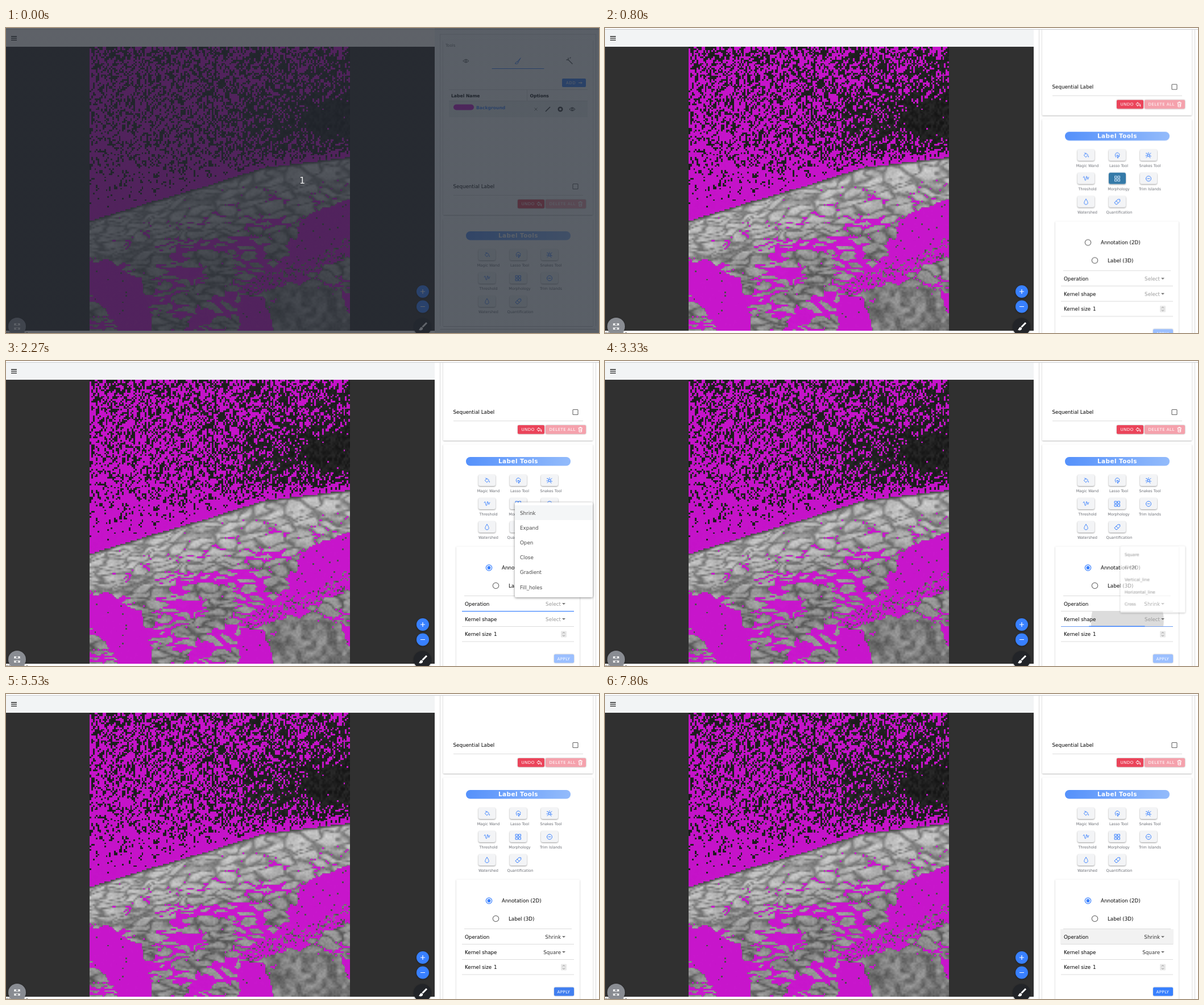
Recreate the animation shown at these times as an HTML page with a canvas. Size 1043x537 px, loop 8000 ms.

```html
<!DOCTYPE html>
<html lang="en">
<head>
<meta charset="utf-8">
<title>Label tools</title>
<style>
html, body { margin: 0; width: 100%; height: 100%; overflow: hidden; background: #303030; }
canvas { position: absolute; left: 147px; top: 33px; width: 458px; height: 500px; }
.mask { image-rendering: pixelated; }
svg { position: absolute; left: 0; top: 0; font: 8.72px "DejaVu Sans", sans-serif; }
.line { stroke: #dcdcdc; }
.card { fill: #fff; filter: drop-shadow(0 1.2px 1px #0004); }
.icon { fill: none; stroke: #3880ff; stroke-linecap: round; stroke-linejoin: round; }
.cap { font-size: 7.08px; letter-spacing: .06em; fill: #fff; }
.tools text { font-size: 6.54px; text-anchor: middle; fill: #6b6e75; }
.value { text-anchor: end; fill: #333; }
.bold { font-weight: bold; font-size: 7.63px; }
.menu .card { filter: drop-shadow(0 1.5px 2px #0007); }
.menu text { fill: #4a4a4a; }
.menu, .grow { transform-box: fill-box; transform-origin: center; }
.menu { transform-origin: 50% 100%; }

/* 1% of the loop is 80 ms */
[class*="t-"] { animation: 8s linear infinite; }
.t-intro { animation-name: intro; }
.t-scroll { animation-name: scroll; }
.t-closed { animation-name: closed; }
.t-open { animation-name: open; }
.t-morph { animation-name: morph; }
.t-rowhover { animation-name: rowhover; }
.t-rowripple { animation-name: rowripple; }
.t-radio { animation-name: radio; }
.t-dot { animation-name: dot; }
.t-opempty { animation-name: opempty; }
.t-opset { animation-name: opset; }
.t-opripple { animation-name: opripple; }
.t-opline { animation-name: opline; }
.t-opmenu { animation-name: opmenu; }
.t-oppick { animation-name: oppick; }
.t-ophover { animation-name: ophover; }
.t-kempty { animation-name: kempty; }
.t-kset { animation-name: kset; }
.t-kripple { animation-name: kripple; }
.t-kfocus { animation-name: kfocus; }
.t-kline { animation-name: kline; }
.t-kmenu { animation-name: kmenu; }
.t-khover { animation-name: khover; }
.t-kpick { animation-name: kset; }
.t-apply { animation-name: apply; }
.t-applyripple { animation-name: applyripple; }
.t-undo { animation-name: undo; }
.t-undoripple { animation-name: undoripple; }
.t-full { animation-name: full; }
.t-shrunk { animation-name: shrunk; }

@keyframes intro { 0%, .86% { opacity: 1 } .87%, 100% { opacity: 0 } }
@keyframes scroll {
  0%, 5.85% { transform: translateY(189px); animation-timing-function: cubic-bezier(.3,.35,.6,.9) }
  10% { transform: translateY(13.7px); animation-timing-function: ease-out }
  14.5%, 100% { transform: none }
}
@keyframes closed { 0%, 5.86% { opacity: 1 } 5.87%, 100% { opacity: 0 } }
@keyframes open { 0%, 5.86% { opacity: 0 } 5.87%, 100% { opacity: 1 } }
@keyframes morph { 0%, 5.86% { opacity: 0 } 5.87%, 16.5% { opacity: 1 } 17.4%, 100% { opacity: 0 } }
@keyframes rowhover { 0%, 16.6% { opacity: 0 } 17.4%, 21.5% { opacity: 1 } 22.5%, 100% { opacity: 0 } }
@keyframes rowripple {
  0%, 17.4% { opacity: 0; transform: scaleX(.3) }
  17.5% { opacity: .8 } 18.37% { opacity: 1; transform: none } 21%, 100% { opacity: 0; transform: none }
}
@keyframes radio { 0%, 17.4% { stroke: #737373 } 18.3%, 100% { stroke: #3880ff } }
@keyframes dot { 0%, 17.5% { transform: scale(0) } 18.37% { transform: scale(.4) } 20%, 100% { transform: none } }
@keyframes opempty { 0%, 34.1% { opacity: 1 } 34.11%, 100% { opacity: 0 } }
@keyframes opset { 0%, 34.1% { opacity: 0 } 34.11%, 100% { opacity: 1 } }
@keyframes opripple { 0%, 23.3% { opacity: 0; transform: scaleX(.3) } 24.2% { opacity: 1; transform: none } 28%, 100% { opacity: 0; transform: none } }
@keyframes opline { 0%, 23.3% { opacity: 1; transform: scaleX(0) } 25%, 36% { opacity: 1; transform: none } 36.6%, 100% { opacity: 0; transform: none } }
@keyframes opmenu {
  0%, 23.6% { opacity: 0; transform: scale(.8) } 26.6%, 34.1% { opacity: 1; transform: none }
  34.12% { opacity: .75; transform: none } 36.4%, 100% { opacity: 0; transform: none }
}
@keyframes oppick { 0%, 27.4% { opacity: 0 } 29%, 100% { opacity: 1 } }
@keyframes ophover { 0%, 94% { opacity: 0 } 96%, 100% { opacity: 1 } }
@keyframes kempty { 0%, 58.35% { opacity: 1 } 58.36%, 100% { opacity: 0 } }
@keyframes kset { 0%, 58.35% { opacity: 0 } 58.36%, 100% { opacity: 1 } }
@keyframes kripple { 0%, 41.59% { opacity: 0; transform: none } 41.6%, 42.5% { opacity: 1; transform: none } 46.6%, 100% { opacity: 0; transform: scaleX(1.2) } }
@keyframes kfocus { 0%, 41.59% { opacity: 0 } 41.6%, 59% { opacity: 1 } 60%, 100% { opacity: 0 } }
@keyframes kline {
  0%, 41.59% { opacity: 0; transform: scaleX(.4) } 41.6% { opacity: 1; transform: scaleX(.49) }
  43.5%, 59% { opacity: 1; transform: none } 60%, 100% { opacity: 0; transform: none }
}
@keyframes kmenu {
  0%, 41.59% { opacity: 0; transform: scale(.8) }
  41.6% { opacity: .6; transform: scale(.828); animation-timing-function: ease-out }
  44%, 58.35% { opacity: 1; transform: none }
  58.36% { opacity: .78; transform: none } 59.9%, 100% { opacity: 0; transform: none }
}
@keyframes khover { 0%, 45.7% { opacity: 0 } 46.6%, 100% { opacity: 1 } }
@keyframes apply {
  0%, 58.35% { fill: #9bbfff } 58.36%, 64.9% { fill: #3880ff }
  64.98%, 69% { fill: #4c8dff } 69.1%, 79% { fill: #417ff0 } 79.1%, 100% { fill: #3880ff }
}
@keyframes applyripple { 0%, 70.7% { opacity: 0; transform: scaleX(.3) } 71.6% { opacity: .25; transform: none } 75%, 100% { opacity: 0; transform: none } }
@keyframes undo { 0%, 89% { fill: #eb445a } 89.1%, 95% { fill: #ed576b } 97.4%, 100% { fill: #eb445a } }
@keyframes undoripple { 0%, 91.5% { opacity: 0; transform: scaleX(.3) } 93% { opacity: .25; transform: none } 97%, 100% { opacity: 0; transform: none } }
@keyframes full { 0%, 70.85% { opacity: 1 } 70.86%, 92.44% { opacity: 0 } 92.45%, 100% { opacity: 1 } }
@keyframes shrunk { 0%, 70.85% { opacity: 0 } 70.86%, 92.44% { opacity: 1 } 92.45%, 100% { opacity: 0 } }
</style>
</head>
<body>
<canvas id="scan"></canvas>
<canvas id="full" class="mask t-full"></canvas>
<canvas id="shrunk" class="mask t-shrunk"></canvas>

<svg width="1043" height="537" viewBox="0 0 1043 537">
  <defs>
    <linearGradient id="pill"><stop stop-color="#5591fb"/><stop offset="1" stop-color="#93bbfb"/></linearGradient>
    <linearGradient id="veil"><stop offset=".7225" stop-color="#242932" stop-opacity=".72"/><stop offset=".7225" stop-color="#262d37" stop-opacity=".76"/></linearGradient>
    <clipPath id="panel"><path d="M754 3h289v534H754z"/></clipPath>
    <rect id="btn" x="-15" y="-10" width="30" height="20" rx="3"/>
    <path id="bucket" d="M-3.5-.5L0-4 3.5-.5 0 3ZM-2.5-4.5L0-2M4.2 1.5c1.2 2-1.2 2 0 0"/>
    <path id="lasso" d="M-2.5 3C-6-3-1-5 1-4.4S5-1 3.6 0M-.5-.5L4 1.6 1.8 2.4 1 4.6Z"/>
    <path id="snakes" d="M-2 0a2 2 0 1 0 4 0 2 2 0 1 0-4 0M-4.5-3.5h2l1 2M4-4l-2.5 2.5M4.5 1.5L2 1M3 4.5L1 2M-4 4l2.5-2.5M0-5v1.5M-5 .5h2"/>
    <path id="threshold" d="M-4.8-2c1-3 2-2 2.2 1S-1 5.5 0 1 0-5 1.5-3.5 2.5 2 3.4 1 3.5-3 5-2.5"/>
    <path id="grid" d="M-4.5-4.5h3.6v3.6h-3.6zM.9-4.5h3.6v3.6H.9zM-4.5.9h3.6v3.6h-3.6zM.9.9h3.6v3.6H.9z"/>
    <path id="trim" d="M-4.5 0a4.5 4.5 0 1 0 9 0 4.5 4.5 0 1 0-9 0M-2 0h4"/>
    <path id="drop" d="M0-4.8C4.5.5 4 4.5 0 4.5S-4.5.5 0-4.8Z"/>
    <path id="patch" d="M-4.8 1.2L1-4.5 4.6-4.5 4.8-1-1 4.5Q-3 5-4.8 1.2M-2-1.5L1.8 1.8"/>
    <path id="eye" d="M-5 0Q0-6 5 0 0 6-5 0M-1.7 0a1.7 1.7 0 1 0 3.4 0 1.7 1.7 0 1 0-3.4 0"/>
    <path id="brush" d="M5-5L-.5 1M5-5L1 2M-1 1.5C-4 1-2.5 4.5-5 4.5-2 6 1 5 .8 2.5Z"/>
    <path id="caret" d="M-3-1.3h6L0 1.5z"/>
  </defs>

  <path fill="#fff" d="M0 0h1043v537H754V33H0zM0 533h754v4H0z"/>
  <path fill="#f2f4f5" d="M0 3h754v30H0z"/>
  <path stroke="#c9cbce" d="M0 2.5h1043"/>
  <path stroke="#222" stroke-width="1.3" d="M9 15h10M9 18.2h10M9 21.4h10"/>
  <text x="0" y="541" font-size="7.5" fill="#333">Slice: 1 / 1</text>

  <g fill="#3880ff" filter="drop-shadow(0 1px 1.5px #0006)">
    <circle cx="733" cy="464" r="11"/><circle cx="733" cy="490.500" r="11"/>
    <circle cx="732.5" cy="526" r="15.5" fill="#222428"/><circle cx="19.5" cy="525.5" r="15.5" fill="#898c92"/>
  </g>
  <path stroke="#fff" stroke-width="1.2" d="M729 464h8M733 460v8M729 490.5h8"/>
  <g fill="none" stroke="#fff" stroke-width="1.2">
    <path d="M15 524v-3.5h3.5M15 520.5l3.5 3.5M24 524v-3.5h-3.5M24 520.5l-3.5 3.5M15 527v3.5h3.5M15 530.5l3.5-3.5M24 527v3.5h-3.5M24 530.5l-3.5-3.5"/>
    <path stroke-width="3" d="M740 519l-7.5 7.5"/>
    <path fill="#fff" stroke="none" d="M731 526.5c3 1 3 4.5 0 5.5-2 .8-4 .3-5-.5 2-1 1.5-4.5 5-5"/>
  </g>

  <g clip-path="url(#panel)"><g class="t-scroll">
    <rect x="763.5" y="-178" width="274" height="800" fill="#fefefe" stroke="#dadada"/>
    <rect class="card" x="769" y="-168" width="263" height="308" rx="1"/>
    <rect class="card" x="769" y="147" width="263" height="470" rx="1"/>
    <g class="t-closed">
      <path fill="#fff" d="M755 336h288v220H755z"/>
      <path stroke="#c4c4c4" d="M769 336.5h263M763.5 341.5h274"/>
    </g>

    <text x="773" y="-156" font-size="7.08" fill="#777">Tools</text>
    <g class="icon">
      <use href="#eye" x="809" y="-131" stroke="#666"/><use href="#brush" x="900" y="-131"/>
      <path stroke="#555" stroke-width="1.4" d="M989-133l7 7M989-136v2M986-133h2M992-136l1-1"/>
      <path d="M855-117.5h91"/>
    </g>
    <rect x="978" y="-100" width="42" height="15" rx="2" fill="#3880ff"/>
    <text class="cap" x="985" y="-89.8">ADD</text>
    <path fill="none" stroke="#fff" d="M1007-92.5h6m-2-2l2 2-2 2"/>
    <path class="line" fill="none" d="M779-80.5h244M779-60.5h244M916.5-80v20"/>
    <path fill="#eef0f2" d="M779-60h244v28H779z"/>
    <g class="bold"><text x="783" y="-67">Label Name</text><text x="921.5" y="-67">Options</text><text x="827" y="-46" fill="#3880ff">Background</text></g>
    <rect x="787" y="-54.5" width="36" height="10" rx="5" fill="#c814cd"/>
    <g fill="none" stroke="#333">
      <path stroke="#777" d="M929.5-48.5l5 5m0-5l-5 5"/><path stroke-width="1.6" d="M949-42l8-8"/>
      <circle cx="975" cy="-46" r="3.3" stroke-width="2.5"/><use href="#eye" x="996" y="-46"/>
    </g>

    <text x="786.5" y="93.3">Sequential Label</text>
    <rect x="997" y="85.5" width="9" height="9" rx="1" fill="none" stroke="#666" stroke-width="1.1"/>
    <path class="line" d="M787 105.5h228"/>
    <g filter="drop-shadow(0 .8px .8px #0005)">
      <rect class="t-undo" x="900" y="113" width="47" height="15.5" rx="2" fill="#eb445a"/>
      <rect x="949" y="113" width="71" height="15.5" rx="2" fill="#f5a1ac"/>
    </g>
    <rect class="grow t-undoripple" x="900" y="113" width="47" height="15.5" rx="2" fill="#fff"/>
    <text class="cap" x="906.5" y="123.2">UNDO</text><text class="cap" x="955.5" y="123.2">DELETE ALL</text>
    <path fill="none" stroke="#fff" d="M937 117l-3 3.5 3 3.5v-2c3-.5 4 .5 4.5 2.5 1-4-1.5-5.5-4.5-5.5zM1006.5 118h7.5M1009 118v-1.5h2.5v1.5M1007.5 118l.5 7h4.5l.5-7M1009.5 120v3.5M1011.5 120v3.5"/>

    <rect x="809" y="169" width="184" height="15.5" rx="7.5" fill="url(#pill)"/>
    <text x="901" y="180.4" text-anchor="middle" font-size="10.4" font-weight="bold" letter-spacing=".45" fill="#fff">Label Tools</text>

    <g fill="#f3f4f6" filter="drop-shadow(0 1px 1px #0006)">
      <use href="#btn" x="846" y="210"/><use href="#btn" x="901" y="210"/><use href="#btn" x="956" y="210"/>
      <use href="#btn" x="846" y="251"/><use href="#btn" x="901" y="251"/><use href="#btn" x="956" y="251"/>
      <use href="#btn" x="846" y="292"/><use href="#btn" x="901" y="292"/>
    </g>
    <g class="icon">
      <use href="#bucket" x="846" y="210.5"/><use href="#lasso" x="901" y="210.5"/><use href="#snakes" x="956" y="210.5"/>
      <use href="#threshold" x="846" y="251.5"/><use href="#grid" x="901" y="251.5"/><use href="#trim" x="956" y="251.5"/>
      <use href="#drop" x="846" y="292.5"/><use href="#patch" x="901" y="292.5"/>
    </g>
    <g class="t-morph"><use href="#btn" x="901" y="251" fill="#357aa8"/><use href="#grid" x="901" y="251.5" fill="none" stroke="#d8ecff"/></g>
    <g class="tools">
      <text x="848.5" y="230.5">Magic Wand</text><text x="903.5" y="230.5">Lasso Tool</text><text x="958.5" y="230.5">Snakes Tool</text>
      <text x="848.5" y="271.5">Threshold</text><text x="903.5" y="271.5">Morphology</text><text x="958.5" y="271.5">Trim Islands</text>
      <text x="848.5" y="312.5">Watershed</text><text x="904.5" y="312.5">Quantification</text>
    </g>

    <g class="t-open">
      <rect class="card" x="792" y="326.5" width="217" height="260" rx="1"/>
      <rect class="t-rowhover" x="837" y="350" width="120" height="26" fill="#f2f2f2"/>
      <rect class="grow t-rowripple" x="840" y="350" width="107" height="26" rx="4" fill="#c8c8c8"/>
      <g fill="none" stroke="#737373" stroke-width="1.2">
        <circle class="t-radio" cx="849.5" cy="364" r="5.2"/><circle cx="861.5" cy="395.5" r="5.2"/>
      </g>
      <circle class="grow t-dot" cx="849.5" cy="364" r="3" fill="#3880ff"/>
      <text x="872" y="367">Annotation (2D)</text><text x="884" y="398.5">Label (3D)</text>

      <rect class="t-ophover" x="801" y="414" width="199" height="27" fill="#f2f2f2"/>
      <g fill="#dcdcdc">
        <rect class="grow t-opripple" x="802" y="414" width="197" height="27"/>
        <path class="grow t-kripple" d="M857 441h124q3 13 1 26.5H855q-1-13 2-26.5"/>
      </g>
      <path class="line" d="M806 413.5h189M802 440.5h197M802 467.5h197M802 494h197"/>
      <rect class="grow t-opline" x="802" y="440" width="197" height="1.2" fill="#3880ff"/>
      <path class="t-kfocus" stroke="#6d9df2" d="M802 467.5h197"/>
      <rect class="grow t-kline" x="802" y="466.5" width="197" height="1.5" fill="#3880ff"/>
      <text x="807" y="430.7">Operation</text><text x="807" y="457.5">Kernel shape</text><text x="807" y="484.2">Kernel size</text><text x="858" y="484.2">1</text>
      <g class="value">
        <text class="t-opempty" x="976" y="430.7" fill="#999">Select</text><text class="t-opset" x="976" y="430.7">Shrink</text>
        <text class="t-kempty" x="976" y="457.5" fill="#999">Select</text><text class="t-kset" x="976" y="457.5">Square</text>
      </g>
      <g fill="#666"><use href="#caret" x="981" y="427.5"/><use href="#caret" x="981" y="454.3"/></g>
      <rect x="976" y="475.5" width="10" height="11" rx="1" fill="#e8e8e8"/>
      <path fill="none" stroke="#777" stroke-width=".8" d="M979 479.5l2-2 2 2M979 482.5l2 2 2-2"/>
      <rect class="t-apply" x="964" y="516.5" width="35" height="15" rx="2" fill="#9bbfff" filter="drop-shadow(0 .8px .8px #0004)"/>
      <rect class="grow t-applyripple" x="964" y="516.5" width="35" height="15" rx="2" fill="#fff"/>
      <text class="cap" x="969.5" y="526.6">APPLY</text>
    </g>
  </g></g>

  <g class="menu t-opmenu">
    <rect class="card" x="895" y="249" width="137" height="167" rx="2"/>
    <rect class="t-oppick" x="895" y="254" width="137" height="26" fill="#eef1f3"/>
    <text x="904" y="270.5">Shrink</text><text x="904" y="296.7">Expand</text><text x="904" y="322.9">Open</text>
    <text x="904" y="349.1">Close</text><text x="904" y="375.3">Gradient</text><text x="904" y="401.5">Fill_holes</text>
  </g>
  <g class="menu t-kmenu">
    <rect class="card" x="895" y="302" width="137" height="141" rx="2"/>
    <rect class="t-khover" x="895" y="307" width="137" height="26" fill="#eef1f3"/>
    <path class="t-kpick" fill="#dcdfe3" d="M899 307h70q5 13 2 26h-72q-3-13 0-26"/>
    <text x="904" y="323.7">Square</text><text x="904" y="349.9">Circle</text><text x="904" y="376.1">Vertical_line</text>
    <text x="904" y="402.3">Horizontal_line</text><text x="904" y="428.5">Cross</text>
  </g>

  <g class="t-intro">
    <rect width="1043" height="537" fill="url(#veil)"/>
    <text x="521" y="274" text-anchor="middle" font-size="16" fill="#eee">1</text>
  </g>
</svg>

<script>
const COLS = 160, ROWS = 175;
const clamp = (v, lo = 0, hi = 1) => Math.min(hi, Math.max(lo, v));
const ramp = (a, b, v) => { const t = clamp((v - a) / (b - a)); return t * t * (3 - 2 * t); };
const mix = (a, b, t) => a + (b - a) * t;
const bump = (x, y, cx, cy, rx, ry) => Math.exp(-(((x - cx) / rx) ** 2) - ((y - cy) / ry) ** 2);

function hash(x, y, seed = 0) {
  const n = Math.sin(x * 127.1 + y * 311.7 + seed * 74.7) * 43758.5453;
  return n - Math.floor(n);
}

function noise(x, y, seed) {
  const i = Math.floor(x), j = Math.floor(y), u = ramp(0, 1, x - i), v = ramp(0, 1, y - j);
  return mix(mix(hash(i, j, seed), hash(i + 1, j, seed), u),
             mix(hash(i, j + 1, seed), hash(i + 1, j + 1, seed), u), v);
}

// Gap between the nearest two cell centres: zero on the seams between fibres.
function seam(x, y) {
  let first = 9, second = 9;
  const ci = Math.floor(x), cj = Math.floor(y);
  for (let j = cj - 1; j <= cj + 1; j++) for (let i = ci - 1; i <= ci + 1; i++) {
    const d = Math.hypot(i + hash(i, j, 5) - x, j + hash(i, j, 6) - y);
    if (d < first) { second = first; first = d; } else if (d < second) second = d;
  }
  return second - first;
}

const ridge = [[147, 338], [250, 306], [350, 277], [450, 245], [520, 236], [606, 226]];
function ridgeY(x) {
  const k = Math.max(1, ridge.findIndex(p => p[0] >= x)), [x0, y0] = ridge[k - 1], [x1, y1] = ridge[k];
  return mix(y0, y1, (x - x0) / (x1 - x0));
}

const cavities = new Path2D(`M610 299L540 321 520 336 510 362 496 398 505 418 545 400 610 362Z
  M140 413L175 404 200 425 236 441 250 485 256 540H200L180 502 140 462Z
  M410 470L452 470 471 540H406L413 500Z M583 452L610 478V505L596 490Z`);
const speckled = new Path2D("M496 398L610 362V400L545 422 500 446 440 468 400 464 440 435Z");
const probe = document.createElement("canvas").getContext("2d");

// Dark sky with grain in slanted streaks.
function sky(x, y, i, j, top) {
  const depth = y - top, across = (x - 147) / 458, lane = i + (j >> 1);
  const sum = hash(lane, j, 1) + hash(lane, j + 1, 1) + .8 * hash(lane, j >> 1, 12);
  const level = 1 / (1 + Math.exp(-3.6 * (sum - 1.4)));
  const hollow = bump(x, y, 575, 165, 75, 55);
  let chance = .61 - .24 * across + .17 * (1 - across) * (y - 33) / 200
    - .5 * hollow - .3 * bump(x, y, 450, 190, 60, 50);
  chance = clamp(chance, .02);
  chance += (1 - chance) * Math.exp(depth / (55 - 45 * across));
  return [26 + 24 * level - 8 * hollow + 40 * ramp(-6, 0, depth), level > 1 - chance];
}

function tissue(x, y, i, j, top) {
  const depth = y - top, grain = hash(i, j, 9);
  const wobble = noise(x / 20, y / 12, 2) - .5, sway = noise(x / 45, y / 30, 13) - .5;
  const flow = y - (top - 280) * (1 - depth / 170) + 14 * sway;
  const gap = seam(x / 42 + wobble * .6, flow / 12 + wobble);
  const deep = ramp(20, 150, depth);
  const body = ramp(-.05, .42, gap);
  const peak = mix(208, 158, deep);
  let gray = mix(mix(118, 84, deep), peak, body * mix(.65, 1, noise(x / 14, y / 8, 3))) + (grain - .5) * 22;
  const corner = ramp(440, 480, x) * ramp(435, 465, y);
  gray = mix(gray, 92 + 62 * noise(x / 9, y / 9, 4) + (grain - .5) * 24, corner);
  gray = mix(75, gray, ramp(0, 6, depth));

  const jx = x + 6 * (noise(i / 3, j / 3, 7) - .5), jy = y + 6 * (noise(i / 3, j / 3, 8) - .5);
  if (probe.isPointInPath(cavities, jx, jy)) return [72 + 25 * grain, grain > (x > 480 ? .022 : .008)];
  if (probe.isPointInPath(speckled, jx, jy)) return [gray * .8, grain < .78];
  const patch = ramp(.3, .8, noise(x / 34, y / 20, 11));
  const reach = .38 * ramp(20, 120, depth) * patch * (1 - corner);
  return [gray, gap + .06 * (grain - .5) < reach - .02];
}

function sample(k) {
  const i = k % COLS, j = Math.floor(k / COLS);
  const x = 147 + i * 458 / COLS, y = 33 + j * 500 / ROWS, top = ridgeY(x);
  return (y < top ? sky : tissue)(x, y, i, j, top);
}

const pixels = Array.from({ length: COLS * ROWS }, (_, k) => sample(k));

// A marked pixel stays only if its whole 3 by 3 neighbourhood is marked.
function survives(k) {
  const i = k % COLS, j = Math.floor(k / COLS);
  for (let y = Math.max(0, j - 1); y <= Math.min(ROWS - 1, j + 1); y++)
    for (let x = Math.max(0, i - 1); x <= Math.min(COLS - 1, i + 1); x++)
      if (!pixels[y * COLS + x][1]) return false;
  return true;
}

function paint(id, colour) {
  const canvas = document.getElementById(id);
  canvas.width = COLS; canvas.height = ROWS;
  const ctx = canvas.getContext("2d"), image = ctx.createImageData(COLS, ROWS);
  for (let k = 0; k < COLS * ROWS; k++) image.data.set(colour(k), k * 4);
  ctx.putImageData(image, 0, 0);
}

const ink = on => on ? [205, 18, 210, 242] : [0, 0, 0, 0];
paint("scan", k => { const g = pixels[k][0]; return [g, g, g, 255]; });
paint("full", k => ink(pixels[k][1]));
paint("shrunk", k => ink(survives(k)));
</script>
</body>
</html>
```
